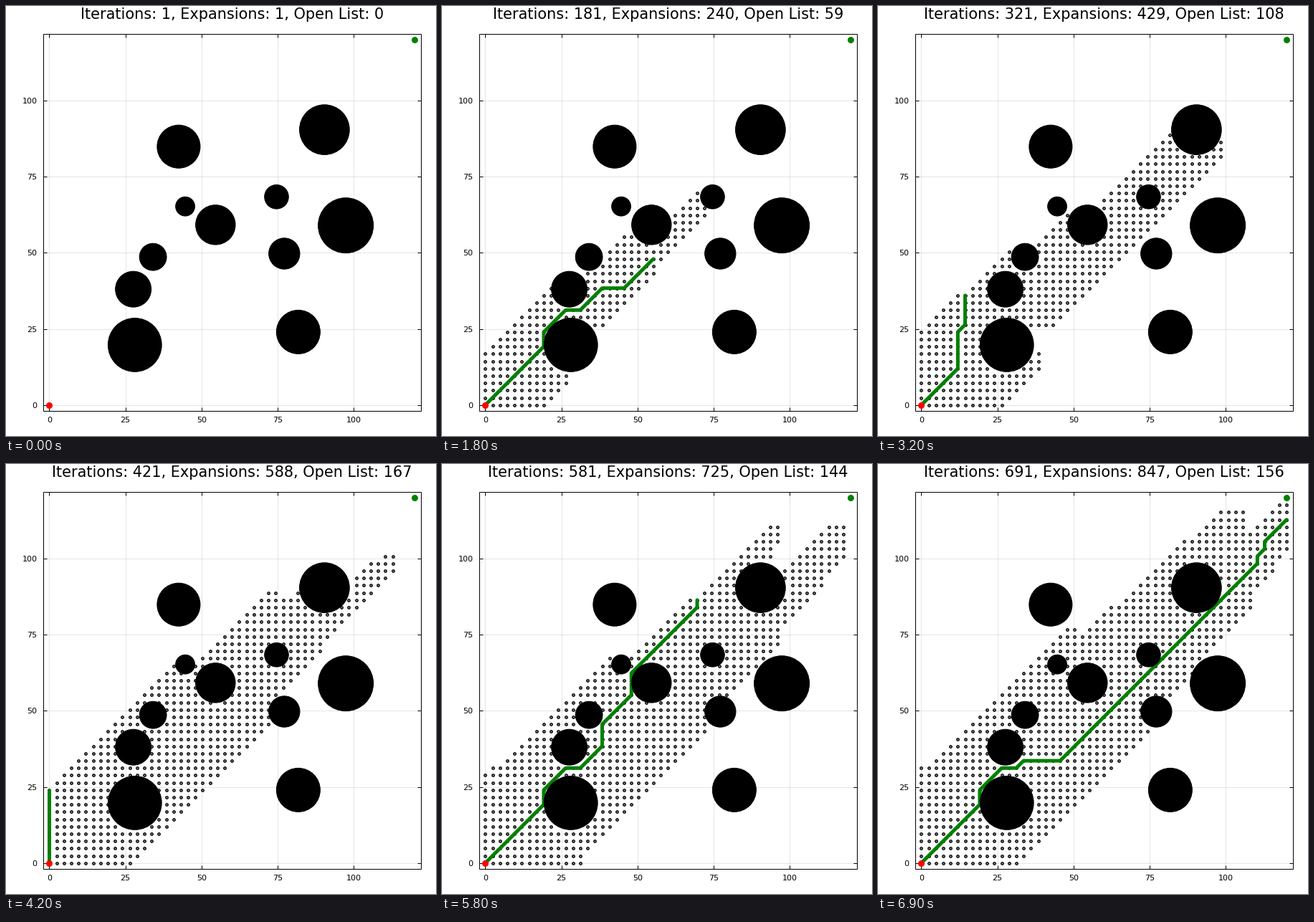
A matplotlib script for the animation above (7000 ms loop, 600x600 px).

```python
import math

import matplotlib.pyplot as plt
from matplotlib.animation import FuncAnimation
from matplotlib.patches import Circle, Rectangle

# Search world
STEP = 2.4
CELLS = 50
START, GOAL = (0, 0), (CELLS, CELLS)
MOVES = [(1, 0), (0, 1), (-1, 0), (0, -1), (1, 1), (1, -1), (-1, -1)]
OBSTACLES = [  # x, y, radius
    (42.5, 84.9, 7.07), (90.4, 90.45, 8.2), (44.65, 65.25, 3.15),
    (54.6, 59.2, 6.52), (74.65, 68.4, 3.95), (97.4, 59.0, 9.06),
    (77.2, 49.75, 5.1), (34.07, 48.65, 4.45), (27.6, 38.05, 5.88),
    (28.1, 19.75, 8.8), (81.8, 24.0, 7.18),
]

# Playback
FRAMES, INTERVAL = 70, 100
ITERATIONS_PER_FRAME = 10

# Stage, in pixels
SIZE, DPI = 600, 100
SCALE = 4.2475
LEFT, RIGHT, TOP, BOTTOM = 52, 578.5, 38.5, 565.3
TICKS = range(0, 101, 25)
GREEN = "#008000"


def px(x):
    return 60.4 + SCALE * x


def py(y):
    return 556.8 - SCALE * y


def pt(pixels):
    return pixels * 72 / DPI


def is_free(cell):
    i, j = cell
    if not (0 <= i <= CELLS and 0 <= j <= CELLS):
        return False
    return all(math.hypot(i * STEP - x, j * STEP - y) > r
               for x, y, r in OBSTACLES)


def estimate(cell):
    dx = (GOAL[0] - cell[0]) * STEP
    dy = (GOAL[1] - cell[1]) * STEP
    return math.sqrt(dx * dx + dy * dy)


def trace(parent, cell):
    path = []
    while cell is not None:
        path.append(cell)
        cell = parent[cell]
    return path


def search():
    """Run A* and keep a snapshot for every frame."""
    cost, parent = {START: 0.0}, {START: None}
    queue, closed = {START: estimate(START)}, set()
    shots = []
    iteration = 0
    while queue and len(shots) < FRAMES:
        cell = min(queue, key=lambda c: (queue[c], c[1], c[0]))
        del queue[cell]
        closed.add(cell)
        iteration += 1
        if iteration % ITERATIONS_PER_FRAME == 1:
            title = (f"Iterations: {iteration}, Expansions: {len(cost)}, "
                     f"Open List: {len(queue)}")
            shots.append((title, list(cost), trace(parent, cell)))
        for di, dj in MOVES:
            near = (cell[0] + di, cell[1] + dj)
            if near in closed or not is_free(near):
                continue
            length = STEP * math.sqrt(2) if di and dj else STEP
            total = cost[cell] + length
            if near not in cost or total < cost[near]:
                cost[near] = total
                parent[near] = cell
                queue[near] = total + estimate(near)
    return shots


def to_pixels(cells):
    return ([px(i * STEP) for i, _ in cells], [py(j * STEP) for _, j in cells])


def draw_axes(ax):
    thin = dict(color="black", lw=pt(1), solid_capstyle="butt")
    grid = dict(color="black", alpha=0.1, lw=pt(1), zorder=1)
    for value in TICKS:
        x, y = px(value), py(value)
        ax.plot([x, x], [TOP, BOTTOM], **grid)
        ax.plot([LEFT, RIGHT], [y, y], **grid)
        for edge, inner in ((BOTTOM, BOTTOM - 5), (TOP, TOP + 5)):
            ax.plot([x, x], [edge, inner], zorder=2, **thin)
        for edge, inner in ((LEFT, LEFT + 5), (RIGHT, RIGHT - 5)):
            ax.plot([edge, inner], [y, y], zorder=2, **thin)
        ax.text(x, 581, str(value), fontsize=8, ha="center", va="baseline")
        ax.text(43.5, y + 4, str(value), fontsize=8, ha="right", va="baseline")
    ax.add_patch(Rectangle((LEFT, TOP), RIGHT - LEFT, BOTTOM - TOP, fill=False,
                           ec="black", lw=pt(1), zorder=2))


def draw_world(ax):
    for x, y, r in OBSTACLES:
        ax.add_patch(Circle((px(x), py(y)), r * SCALE, fc="black", ec="black",
                            lw=pt(1), zorder=5))
    for cell, color in ((START, "red"), (GOAL, GREEN)):
        x, y = to_pixels([cell])
        ax.plot(x, y, "o", color=color, ms=pt(9), mew=0, zorder=6)


plt.rcParams["font.family"] = "DejaVu Sans"
fig = plt.figure(figsize=(SIZE / DPI, SIZE / DPI), dpi=DPI, facecolor="white")
ax = fig.add_axes([0, 0, 1, 1])
ax.set_xlim(0, SIZE)
ax.set_ylim(SIZE, 0)
ax.axis("off")

draw_axes(ax)
draw_world(ax)
dots, = ax.plot([], [], "o", ms=pt(3.6), mfc="#808080", mec="black",
                mew=pt(1.2), zorder=3)
route, = ax.plot([], [], color=GREEN, lw=pt(5), solid_capstyle="round",
                 solid_joinstyle="round", zorder=4)
heading = ax.text((LEFT + RIGHT) / 2, 18.5, "", fontsize=15, ha="center",
                  va="baseline")

snapshots = search()


def update(frame):
    title, cells, path = snapshots[min(frame, len(snapshots) - 1)]
    heading.set_text(title)
    dots.set_data(*to_pixels(cells))
    route.set_data(*to_pixels(path if len(path) > 1 else []))
    return dots, route, heading


anim = FuncAnimation(fig, update, frames=FRAMES, interval=INTERVAL,
                     repeat=True, repeat_delay=0, blit=False)
plt.show()
```
